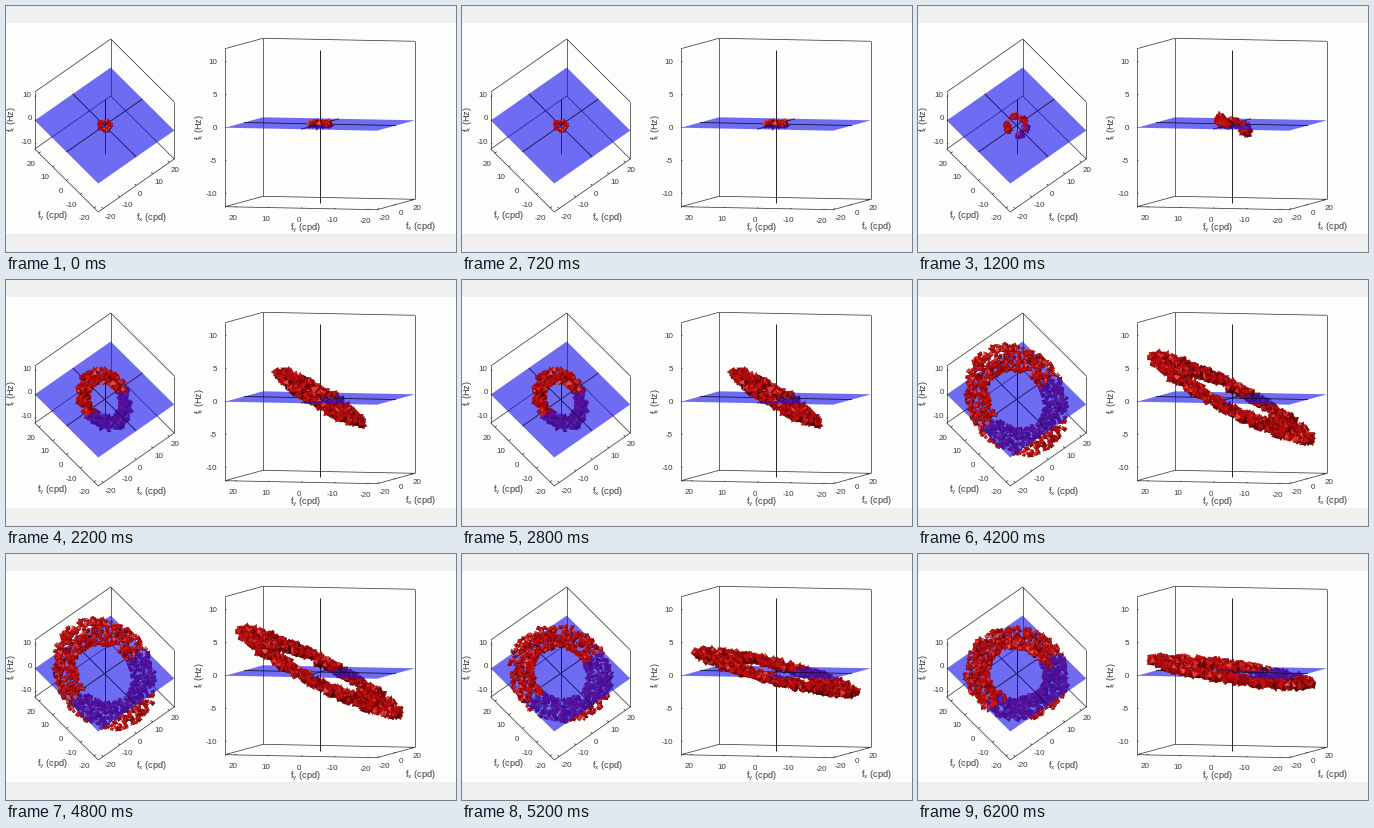
These frames come from a looping animation (450 px wide and 246 px high, 7.2 s). A matplotlib script:

```python
import itertools

import numpy as np
import matplotlib.pyplot as plt
from matplotlib.animation import FuncAnimation
from matplotlib.collections import PolyCollection

W, H, DPI = 450, 246, 64
PX = 72 / DPI                 # points per pixel
SPATIAL, TEMPORAL = 23, 12    # axis half-ranges (cpd, Hz)
STEP = 200                    # ms per animation step
INK = "#3a3a3a"
PAPER = "#fdfdfb"

plt.rcParams["font.family"] = "Liberation Sans"

# inner and outer radius, slope, half thickness, piece count, piece size, clump angles
STAGES = [
    (1.6, 3.3, 0.00, 0.30, 40, 1.05, None),
    (3.6, 5.4, 0.20, 0.45, 100, 1.35, (65, 148, 170, 2, -44, -106)),
    (7.2, 12.8, 0.30, 0.60, 420, 1.35, None),
    (12.7, 24.0, 0.46, 0.40, 950, 1.25, None),
    (12.7, 24.0, 0.27, 0.40, 950, 1.25, None),
    (12.7, 23.9, 0.13, 0.35, 950, 1.25, None),
    (12.9, 24.0, 0.075, 0.40, 900, 1.35, None),
]

OCTAHEDRON = np.vstack([np.eye(3), -np.eye(3)])
FACES = list(itertools.product((0, 3), (1, 4), (2, 5)))


def ring(index):
    """Jagged pieces on a tilted ring: triangles and normals in unit-cube space."""
    inner, outer, slope, thick, count, size, clumps = STAGES[index]
    rng = np.random.default_rng(40 + index)
    if clumps:
        angle = np.radians(rng.choice(clumps, count) + rng.uniform(-17, 17, count))
    else:
        angle = 2 * np.pi * (np.arange(count) * 0.618034 + rng.uniform(0, 0.02, count))
    across = rng.uniform(-1, 1, count)
    radius = (inner + outer) / 2 + across * (outer - inner) / 2
    fx, fy = radius * np.cos(angle), radius * np.sin(angle)
    bulge = thick * np.sqrt(1 - across ** 2) + 0.05
    ft = slope * fy + bulge * rng.uniform(-1, 1, count)
    centres = np.stack([fx / SPATIAL, fy / SPATIAL, ft / TEMPORAL], axis=1)

    turns = np.linalg.qr(rng.normal(size=(count, 3, 3)))[0]
    reach = rng.uniform(0.5, 1.3, (count, 6, 1)) * size / SPATIAL
    corners = (OCTAHEDRON * reach) @ turns
    shape = corners[:, FACES].reshape(-1, 3, 3)
    normals = shape.mean(axis=1)
    normals /= np.linalg.norm(normals, axis=1, keepdims=True)
    tris = shape + np.repeat(centres, len(FACES), axis=0)[:, None]
    tris[..., 2] = tris[..., 2].clip(-1, 1)
    return tris, normals


def shade(light):
    """Dark red to red, with a pale glint where the light is strongest."""
    stops = [0, 0.45, 0.93, 1]
    ramps = [(0.24, 0.56, 0.80, 0.90), (0.0, 0.02, 0.07, 0.35), (0.0, 0.03, 0.08, 0.32)]
    return np.stack([np.interp(light, stops, ramp) for ramp in ramps], axis=1)


class View:
    def __init__(self, centre, ex, ey, height):
        self.centre = np.array(centre)
        self.basis = np.array([ex, ey, (0, -height)], float)
        eye = np.cross(self.basis[:, 0], self.basis[:, 1])
        self.eye = eye * np.sign(eye[2]) / np.linalg.norm(eye)
        light = self.eye + np.array([-0.1, 0.35, 0.45])
        self.light = light / np.linalg.norm(light)
        self.draw_box()
        self.below = self.add_pieces(2)
        self.above = self.add_pieces(5)
        self.stages = [self.render(*r) for r in RINGS]

    def project(self, points):
        return self.centre + np.asarray(points, float) @ self.basis

    def line(self, points, z=1, width=0.75, color=INK):
        x, y = self.project(points).T
        ax.plot(x, y, color=color, lw=width * PX, zorder=z, solid_capstyle="butt")

    def draw_box(self):
        left, back, right, front = (-1, 1), (1, 1), (1, -1), (-1, -1)
        self.line([(*c, -1) for c in (left, back, right, front, left)])
        self.line([(*c, 1) for c in (left, back, right)])
        for c in (left, back, right):
            self.line([(*c, -1), (*c, 1)])
        plane = self.project([(*c, 0) for c in (left, back, right, front)])
        ax.fill(*plane.T, color=(0.09, 0.08, 0.93), alpha=0.62, lw=0, zorder=3)
        self.line([(-1, 0, 0), (1, 0, 0)], 4, 0.8, "#101030")
        self.line([(0, -1, 0), (0, 1, 0)], 4, 0.8, "#101030")
        self.line([(0, 0, -1), (0, 0, 0)], 1.5, 0.9, "#101010")
        self.line([(0, 0, 0), (0, 0, 0.94)], 4, 0.9, "#101010")

    def add_pieces(self, z):
        return ax.add_collection(PolyCollection([], lw=0.25, zorder=z))

    def render(self, tris, normals):
        mid = tris.mean(axis=1)
        order = np.argsort(mid @ self.eye)
        order = order[normals[order] @ self.eye > -0.1]
        flat = self.project(tris[order])
        colors = shade((normals[order] @ self.light).clip(0, 1))
        under = mid[order, 2] < 0
        return [(flat[m], colors[m]) for m in (under, ~under)]

    def show(self, index):
        for pieces, (verts, colors) in zip((self.below, self.above), self.stages[index]):
            pieces.set_verts(verts)
            pieces.set_facecolor(colors)
            pieces.set_edgecolor(colors)

    def ticks(self, values, span, spot, inward, offset, align):
        """Tick marks and numbers; spot maps a scaled value to a point in the cube."""
        for value in values:
            start = np.array(spot(value / span), float)
            self.line([start, start + inward])
            x, y = self.project(start) + offset
            label(x, y, str(value), 8, align)


def label(x, y, text, size, align="center", turn=0):
    ax.text(x, y, text, fontsize=size * PX, color=INK, ha=align, zorder=6,
            va="center_baseline" if not turn else "center", rotation=turn)


def axis_name(x, y, sub, unit, turn=0):
    label(x, y, rf"f$_{{\mathregular{{{sub}}}}}$ ({unit})", 9.1, turn=turn)


def along_x(u):
    return u, -1, -1


def along_y(u):
    return -1, u, -1


def along_z(u):
    return -1, 1, u


fig = plt.figure(figsize=(W / DPI, H / DPI), dpi=DPI, facecolor=PAPER)
ax = fig.add_axes([0, 0, 1, 1])
ax.set_xlim(0, W)
ax.set_ylim(H, 0)
ax.axis("off")
ax.axhspan(0, 17, color="#efefef", lw=0)
ax.axhspan(228, H, color="#efefef", lw=0)

RINGS = [ring(i) for i in range(len(STAGES))]
TENS = range(-20, 21, 10)

tilted = View((98.5, 119.5), (38, -26.5), (-31.75, -31.5), 28.5)
tilted.ticks(TENS, SPATIAL, along_x, (0, 0.05, 0), (1.5, 7.5), "left")
tilted.ticks(TENS, SPATIAL, along_y, (0.05, 0, 0), (-3.5, 10), "right")
tilted.ticks((-10, 0, 10), TEMPORAL, along_z, (0.04, 0, 0), (-3, -2.5), "right")
axis_name(46, 208, "y", "cpd")
axis_name(145, 209.5, "x", "cpd")
axis_name(6, 113.5, "t", "Hz", 90)

side = View((314, 118), (19, -5.2), (-76, -1.5), 79)
side.ticks((-20, 0, 20), SPATIAL, along_x, (0, 0.03, 0), (4.5, 8), "center")
side.ticks(TENS, SPATIAL, along_y, (0.08, 0, 0), (-2, 11), "center")
side.ticks(range(-10, 11, 5), TEMPORAL, along_z, (0.08, 0, 0), (-8, 0), "right")
axis_name(299, 220.5, "y", "cpd")
axis_name(414, 218.5, "x", "cpd")
axis_name(194, 121, "t", "Hz", 90)


def update(step):
    # The first stage holds 1200 ms, each later one 1000 ms.
    index = max(0, (step * STEP - 200) // 1000)
    tilted.show(index)
    side.show(index)
    return []


anim = FuncAnimation(fig, update, frames=7200 // STEP, interval=STEP,
                     repeat=True, repeat_delay=0, blit=False)
plt.show()
```
